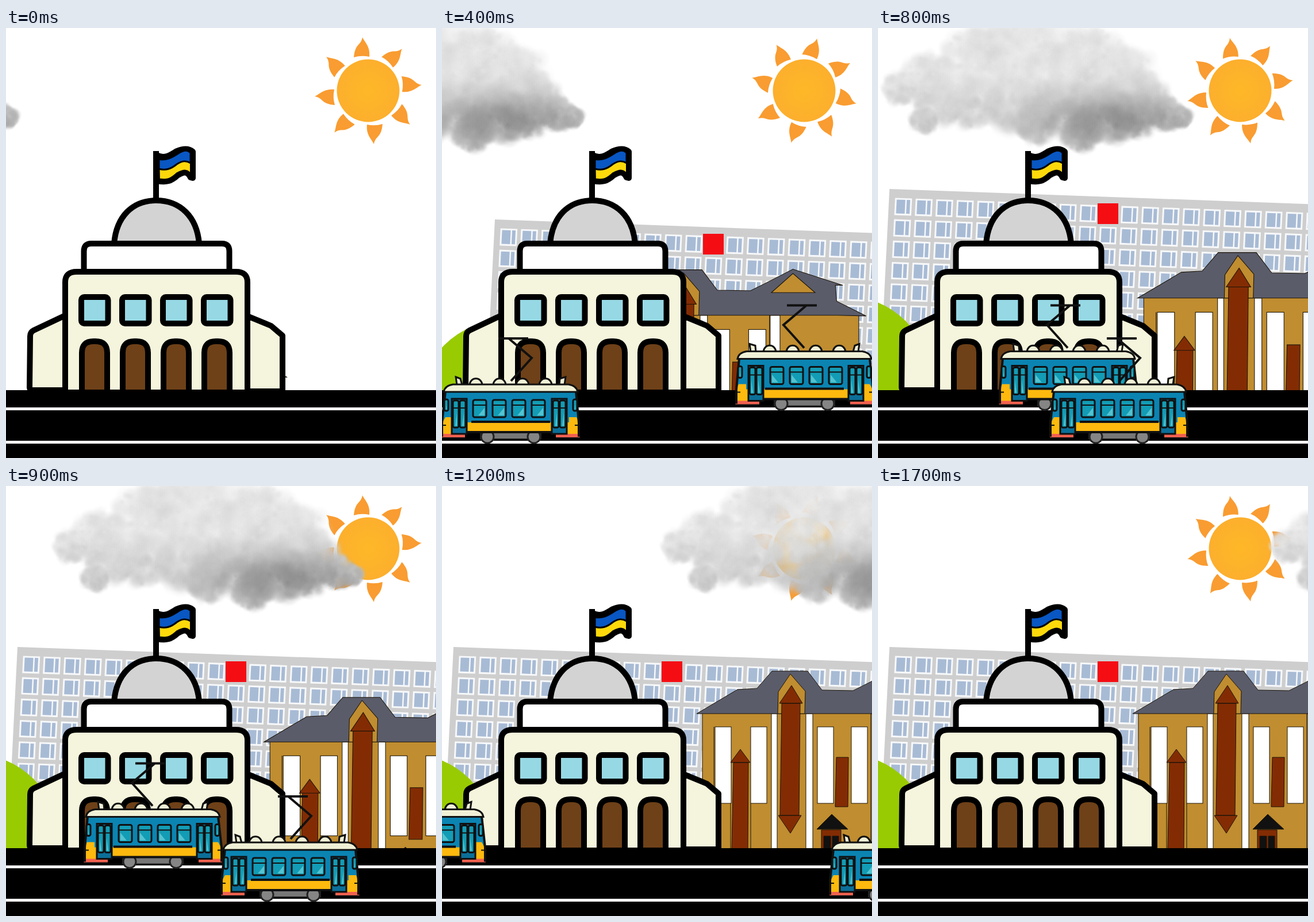
Recreate the animation shown at these times as an HTML page with a canvas. Size 748 px wide and 748 px high, loop 1800 ms.

```html
<!DOCTYPE html>
<html lang="en">
<head>
<meta charset="utf-8">
<title>City street</title>
<style>
html, body { margin: 0; width: 100%; height: 100%; overflow: hidden; background: #fff; }
svg, canvas { position: absolute; left: 0; top: 0; }
.ink { stroke: #000; stroke-width: 10; stroke-linejoin: round; }
.thin { stroke: #1c1408; stroke-width: 1; }
.wall { fill: #c08d30; }
.brown { fill: #832c04; }
.line { fill: none; stroke: #111; stroke-width: 4; }
.fine { stroke-width: 2; }
.cream { fill: #f0f0d6; stroke-width: 3; }
</style>
</head>
<body>
<svg width="748" height="748" viewBox="0 0 748 748">
  <defs>
    <radialGradient id="glow">
      <stop offset="0" stop-color="#feb827"/>
      <stop offset="1" stop-color="#fcaf2d"/>
    </radialGradient>
    <path id="ray" fill="#f99c31" d="M-25-58C-24-70-21-76-16-81Q-11-86-10-93C-6-84 4-77 2-59Q-12-62-25-58Z"/>
  </defs>
  <g transform="translate(630 109)">
    <g id="sun"></g>
    <circle r="54.5" fill="url(#glow)"/>
  </g>
</svg>
<canvas id="cloud" width="570" height="240"></canvas>
<svg width="748" height="748" viewBox="0 0 748 748">
  <g id="office">
    <g transform="matrix(1 .036 -.05 1 20 280)">
      <rect width="830" height="390" fill="#cecece"/>
      <g id="panes"></g>
    </g>
    <rect x="382" y="305" width="36" height="36" fill="#f50d14"/>
  </g>

  <circle id="hill" cx="-57" cy="614" r="148" fill="#99cb02"/>

  <g id="hall" class="thin">
    <path class="wall" d="M-153 68H285V304H-153Z"/>
    <path fill="none" d="M-133 92V304M-104 225V304M-69 225V304M140 68V304"/>
    <g id="slits" fill="#fff"></g>
    <path fill="#5a5c6a" d="M-163 69L-92 27L-58 25L-32-5H30L55 28L109 29L135 16L178-6L259 20H247L249 46L297 70L250 69Z"/>
    <path class="wall" d="M143 32L178 1L214 32ZM-22 69L-21 31L0 0L26 30L25 69Z"/>
    <path class="brown" d="M-15 51H17L15 246H-18ZM-19 51L2 20L21 51ZM-21 246H19L0 277Z"/>
    <path class="brown" d="M-99 154H-73L-74 304H-102ZM-104 154L-87 131L-70 154ZM80 145H101L100 231H78ZM54 271H88V304H54Z"/>
    <path fill="#111" d="M46 270L72 244L100 270ZM58 282H70V304H58ZM73 282H84V304H73Z"/>
  </g>

  <g class="ink">
    <path fill="#f5f4dc" d="M103 500L48 526Q42 529 42 536L41 625Q41 630 48 630H103ZM420 501L461 518L481 535V632H420Z"/>
    <path fill="#d3d3d3" d="M188 375C192 328 220 300 261 300C303 300 332 328 336 375Z"/>
    <path fill="#fff" d="M135.500 424V388Q135.500 375 148 375H376Q388.500 375 388.500 388V424Z"/>
    <path fill="#f5f4dc" d="M103 634V442Q103 424 123 424H400Q420 424 420 442V634Z"/>
    <g id="front"></g>
    <path fill="none" d="M261 214V300"/>
    <path fill="#fdd90b" d="M262 221C275 228 285 222 297 214C309 209 318 209 325 215V261L321 260C315 249 310 250 299 256C287 267 279 269 263 266Z"/>
    <path fill="#0957c3" style="stroke-width:3" d="M266 228C278 231 288 226 300 218C310 212 316 212 321 217V235C313 230 306 231 297 237C286 246 277 248 266 245Z"/>
  </g>

  <path d="M0 630H748V748H0Z"/>
  <path fill="#fffaff" d="M0 660H748V665H0ZM0 718H748V723H0Z"/>

  <g id="backTram"></g>
  <g id="frontTram"></g>
</svg>

<script>
const $ = id => document.getElementById(id);
const times = (n, f) => Array.from({ length: n }, (_, i) => f(i)).join('');
const box = (x, y, w, h, rest = '') =>
  `<rect x="${x}" y="${y}" width="${w}" height="${h}" ${rest}/>`;

$('sun').innerHTML = times(8, i => `<use href="#ray" transform="rotate(${i * 45})"/>`);

$('panes').innerHTML = times(132, i => {
  const x = 10.5 + 35.8 * (i % 22), y = 15 + 37.2 * Math.floor(i / 22);
  return box(x, y, 29.5, 30, 'fill="#f7f8fa"') +
    box(x + 3, y + 3, 15, 24, 'fill="#a8bbd5"') + box(x + 20.5, y + 3, 6, 24, 'fill="#a8bbd5"');
});

$('slits').innerHTML =
  [-131, -69, 47, 106].map(x => box(x, 92, 28, 133)).join('') +
  [[-33, 10], [27, 12], [141, 16]].map(([x, w]) => box(x, 69, w, 235)).join('');

$('front').innerHTML = times(4, i => {
  const x = 131 + 71 * i;
  return box(x, 468, 46.5, 46, 'rx="5" fill="#96d9e4"') +
    `<path fill="#6e4118" d="M${x + 1} 634V565Q${x + 1} 545 ${x + 21} 545H${x + 25}Q${x + 45} 545 ${x + 45} 565V634Z"/>`;
});

function tram() {
  const glass = (x, y, w, h) => box(x, y, w, h, 'fill="#139cb5" stroke="#111" stroke-width="3" rx="3"') +
    `<path fill="#55c3d0" d="M${x + w * .4} ${y + h - 3}L${x + w - 3} ${y + h * .45}V${y + h - 3}Z"/>`;
  const door = x => box(x, 645, 26, 61, 'fill="#0b6f98" stroke="#111" stroke-width="3"') +
    glass(x + 2, 648, 10, 47) + glass(x + 14, 648, 10, 47) +
    `<path class="line fine" d="M${x} 661H${x + 26}"/>`;
  const dome = x => `<path class="line cream" d="M${x - 11} 621C${x - 10} 606 ${x + 10} 606 ${x + 11} 621Z"/>`;
  const wheel = x => `<circle cx="${x}" cy="711" r="11" fill="#858585" stroke="#222" stroke-width="3"/>`;
  return `
    <path class="line" d="M99 540H151M117 540L157 574L121 614"/>
    ${box(68, 703, 105, 12, 'fill="#777" stroke="#222" stroke-width="2"')}
    ${wheel(80)}${wheel(161)}
    ${[60, 101, 141, 181].map(dome).join('')}
    <path class="line cream" d="M25 607L33 610L36 621H27ZM216 607L206 610L205 621H214Z"/>
    <path fill="#0b84b2" d="M7 630H234L239 685V710H199V703H41V710H1V685Z"/>
    <path fill="#fdb90e" d="M2 686L7 677H18V686H222V677H235L239 686V708H199V702H41V708H1Z"/>
    <path fill="#f2614f" d="M1 706H41V713H0ZM199 706H239L241 713H199Z"/>
    <path class="line" d="M7 632L1 686V711M234 632L239 686V711M42 703H198M52 685H189"/>
    <path class="line cream" d="M4 633Q6 622 20 620H221Q235 622 237 633Z"/>
    <path class="line fine" d="M0 713H41M199 713H241M0 691H8M232 691H240"/>
    ${door(18)}${door(192)}
    ${times(4, i => glass(55 + 34 * i, 647, 23, 30) +
      `<path class="line fine" d="M${55 + 34 * i} 656H${78 + 34 * i}"/>`)}
    ${glass(229, 646, 7, 20)}${glass(5, 646, 7, 20)}`;
}
$('frontTram').innerHTML = $('backTram').innerHTML = tram();

// Soft cloud built from seeded puffs around a few lobes.
function paintCloud() {
  const c = $('cloud').getContext('2d');
  let seed = 7;
  const rnd = () => (seed = seed * 16807 % 2147483647) / 2147483647;
  const lobes = [
    [38, 106, 28], [85, 84, 42], [105, 128, 42], [165, 52, 52], [225, 42, 62],
    [305, 50, 65], [375, 62, 64], [425, 88, 58], [462, 126, 44], [503, 150, 28],
    [528, 156, 17], [330, 135, 62], [400, 145, 52], [245, 125, 58], [165, 125, 48],
    [80, 161, 22], [352, 182, 32], [275, 168, 34], [445, 155, 36]
  ];
  for (let i = 0; i < 5200; i++) {
    const [lx, ly, lr] = lobes[Math.floor(rnd() * lobes.length)];
    const a = rnd() * Math.PI * 2, d = rnd() ** .65 * lr;
    const x = lx + Math.cos(a) * d, y = ly + Math.sin(a) * d * .95;
    const r = 4 + rnd() * lr * .33;
    const dark = Math.exp(-(((x - 410) / 130) ** 2) - ((y - 158) / 42) ** 2);
    const g = 226 - 62 * dark - Math.max(0, y - 80) * .26 + (rnd() - .5) * 36;
    const puff = c.createRadialGradient(x, y, 0, x, y, r);
    const tone = `${g | 0},${g | 0},${g | 0}`;
    puff.addColorStop(0, `rgba(${tone},.28)`);
    puff.addColorStop(.5, `rgba(${tone},.15)`);
    puff.addColorStop(1, `rgba(${tone},0)`);
    c.fillStyle = puff;
    c.fillRect(x - r, y - r, 2 * r, 2 * r);
  }
}
paintCloud();

// Keys are [step, ...values], joined by straight lines.
function along(keys, v) {
  const i = keys.findIndex(k => k[0] > v);
  if (i < 0) return keys[keys.length - 1].slice(1);
  const a = keys[i - 1], b = keys[i], p = (v - a[0]) / (b[0] - a[0]);
  return a.slice(1).map((n, j) => n + (b[j + 1] - n) * p);
}
const officePath = [[0, 216, 360], [4, 72, 53], [6, 0, 0]];
const hillPath = [[0, 300, 100], [4, 166, 42], [6, 0, 0]];
const hallPath = [[0, 207, 541, .95], [4, 420, 426, 1.07], [6, 508, 409, 1.07], [8, 626, 396, 1.07], [11, 606, 327, 1]];

const move = (id, t) => $(id).setAttribute('transform', t);
let last = -1;
function draw(now) {
  const n = Math.floor(now % 1800 / 100);
  const v = n > 9 && n < 13 ? n + 1 : n;   // one step is skipped, one is held
  if (v !== last) {
    last = v;
    const [hx, hy, hs] = along(hallPath, v);
    move('sun', `rotate(${5 * v})`);
    move('office', `translate(${along(officePath, v)})`);
    move('hill', `translate(${along(hillPath, v)})`);
    move('hall', `translate(${hx} ${hy}) scale(${hs})`);
    move('frontTram', `translate(${75 * v - 301})`);
    move('backTram', `translate(${1051 - 75 * v} -57.500) scale(-1 1)`);
    $('cloud').style.transform = `translateX(${75 * Math.max(v, 1) - 600}px)`;
  }
  requestAnimationFrame(() => draw(performance.now() - start));
}
const start = performance.now();
draw(0);
</script>
</body>
</html>
```
